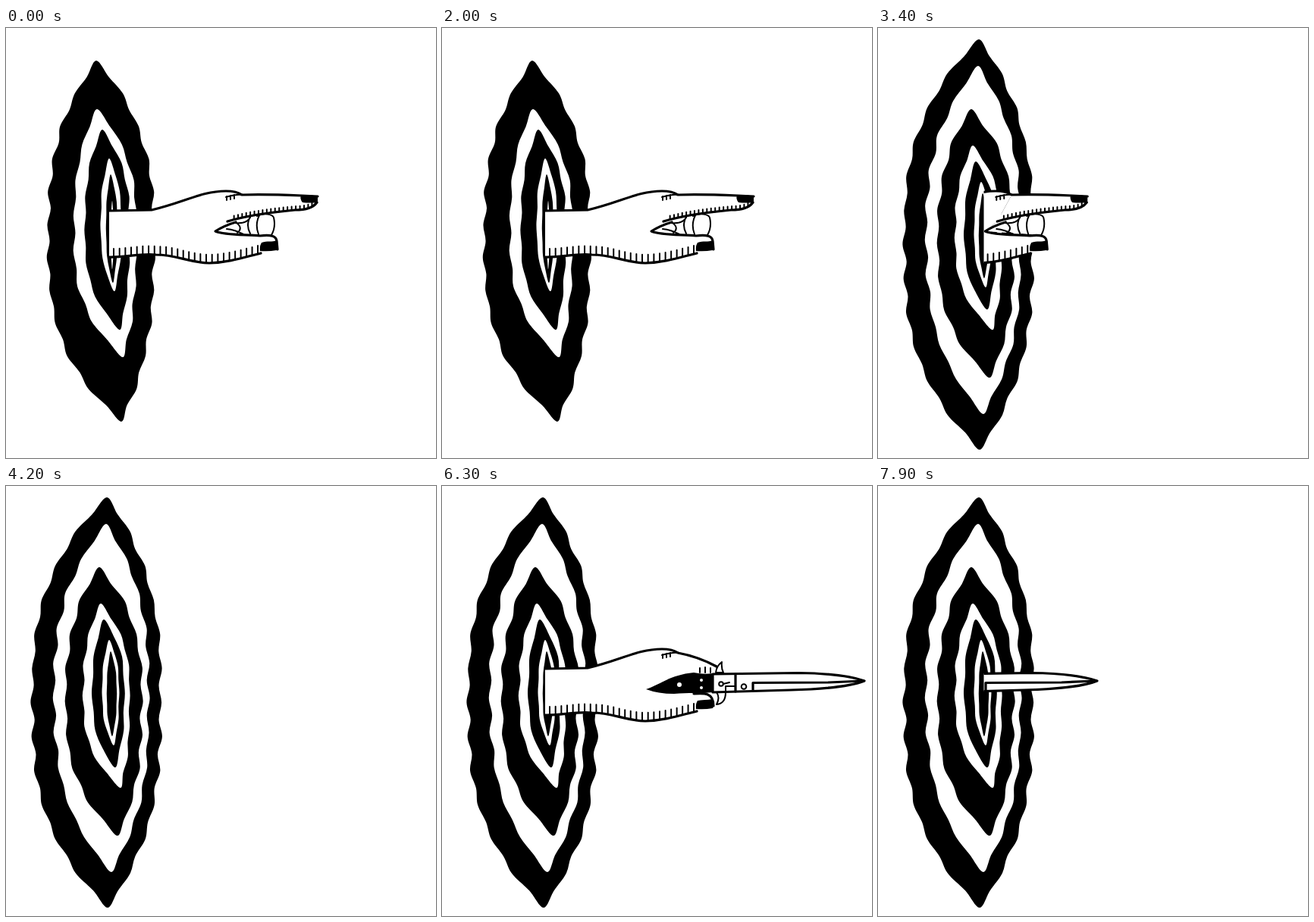
These frames come from a looping animation (567x567 px, 8000 ms). An HTML page:

```html
<!DOCTYPE html>
<html lang="en">
<head>
<meta charset="utf-8">
<title>Portal</title>
<style>
  html, body { margin: 0; width: 100%; height: 100%; overflow: hidden; background: #fff; }
  svg { display: block; width: 100vw; height: 100vh; }
  .line { fill: none; stroke: #000; stroke-width: 3.2; stroke-linecap: round; stroke-linejoin: round; }
  .thin { stroke-width: 2; }
  .paper { fill: #fff; }
  .ink { fill: #000; }
</style>
</head>
<body>
<svg viewBox="0 0 567 567">
  <defs>
    <clipPath id="slit"><rect id="slitBox" width="567" height="567"/></clipPath>
    <g id="arm">
      <path class="paper" d="M135 241L192 240C235 230 258 215 290 215Q304 215 311 220L292 255L276 268Q305 275 335 274L357 281V292L335 297C315 302 295 309 268 310C240 309 225 299 198 299C175 297 155 303 135 302Z"/>
      <path class="line" d="M135 241L192 240C235 230 258 215 290 215Q304 215 311 220"/>
      <path class="line thin" d="M311 220C304 219 297 221 290 223M291 222V227M296 221V226M301 220V225"/>
      <path class="line" id="palmEdge" d="M135 302C155 303 175 297 198 299C225 299 240 309 268 310C295 309 315 302 336 297"/>
      <path class="ink" d="M337 283C344 280 351 283 357 280Q360 287 357 293Q346 295 335 294Q334 288 337 283Z"/>
    </g>
  </defs>
  <g id="small"></g>
  <g id="large"></g>
  <g clip-path="url(#slit)">
    <g id="pointing">
      <use href="#arm"/>
      <path class="paper" d="M311 220L411 222Q413 239 381 240L353 247Q357 262 350 273L276 268L292 255Z"/>
      <path class="line" d="M311 220C340 219 365 220 390 221L411 222"/>
      <path class="line" id="fingerEdge" d="M292 255C318 247 350 243 381 240Q403 240 410 230"/>
      <path class="line" d="M303 256C293 259 284 263 276 268C290 274 318 272 335 274Q356 271 357 281L358 292"/>
      <path class="line thin" d="M302 257Q316 259 322 250M322 249Q316 260 322 271M334 247Q328 259 333 272M304 257Q313 264 305 270M331 248C340 243 352 246 353 250Q356 263 350 273M291 265Q302 266 313 272"/>
      <path class="ink" d="M389 221Q401 219 411 222V230Q400 231 391 230Q387 225 389 221Z"/>
    </g>
    <g id="armed">
      <use href="#arm"/>
      <path class="paper" d="M311 220Q338 225 362 238L358 281L335 283L276 268L292 255Z"/>
      <path class="line" d="M311 220Q338 225 362 238"/>
      <path class="line thin" d="M340 240V246M347 239V246M354 240V246"/>
      <path class="line" d="M332 274C346 273 358 272 358 290"/>
      <path class="line thin" style="fill:#fff" d="M361 246Q362 237 369 232Q368 240 371 246ZM362 272Q367 279 362 288Q374 287 374 272Z"/>
      <path class="line" style="fill:#fff" d="M357 248L470 246.5C510 247 540 251 557 257C540 264 500 268 460 269L357 272Z"/>
      <path class="line" d="M387 248V271M410 270V259.5L510 259L555 257"/>
      <path class="line thin" d="M371 261L379 259M387 264H374V271"/>
      <circle class="line thin" cx="368" cy="261" r="2.8"/>
      <circle class="line thin" cx="398" cy="264.5" r="3.3"/>
      <path class="ink" d="M269 268C286 263 300 249 332 246Q345 249 357 247V272C340 274 325 272 306 274Q285 274 269 268Z"/>
      <circle class="paper" cx="313" cy="262" r="3"/>
      <circle class="paper" cx="342" cy="256" r="2"/>
      <circle class="paper" cx="342" cy="266" r="2"/>
    </g>
  </g>
</svg>
<script>
const byId = id => document.getElementById(id);
const { small, large, pointing, armed, palmEdge, fingerEdge, slitBox } =
  Object.fromEntries([...document.querySelectorAll('[id]')].map(el => [el.id, el]));

let seed = 7;
const random = () => (seed = seed * 16807 % 2147483647) / 2147483647;

function addPath(parent, d, className) {
  const path = document.createElementNS('http://www.w3.org/2000/svg', 'path');
  path.setAttribute('d', d);
  path.setAttribute('class', className);
  parent.appendChild(path);
}

// Smooth closed curve through the points.
function smooth(pts) {
  const at = i => pts[(i + pts.length) % pts.length];
  return 'M' + pts[0] + pts.map((p, i) => {
    const before = at(i - 1), next = at(i + 1), after = at(i + 2);
    const c1 = p.map((v, k) => v + (next[k] - before[k]) / 6);
    const c2 = next.map((v, k) => v - (after[k] - p[k]) / 6);
    return `C${c1} ${c2} ${next}`;
  }).join('') + 'Z';
}

// Wavy spindle between two tips, swelling out to the left and right limits.
function ring([topX, topY], [bottomX, bottomY], left, right) {
  const height = bottomY - topY;
  const count = Math.max(8, 2 * Math.round(height / 44));
  const wave = Math.min(2.6, (right - left) / 40);
  const side = (limit, out) => Array.from({ length: count - 1 }, (_, i) => {
    const u = (i + 1) / count;
    const tip = u < 0.5 ? topX : bottomX;
    const swell = 1 - Math.abs(1 - 2 * u) ** 2.8;
    const bump = (i % 2 ? 1 : -1) * wave * (0.4 + 0.6 * random());
    return [tip + (limit - tip) * swell + out * bump, topY + height * u];
  });
  return smooth([[topX, topY], ...side(right, 1), [bottomX, bottomY], ...side(left, -1).reverse()]);
}

// Rings from the outside in, alternating black and white.
const drawRings = (group, rings) => rings.forEach((args, i) =>
  addPath(group, ring(...args), i % 2 ? 'paper' : 'ink'));

drawRings(small, [
  [[119, 43], [152, 519], 56, 195],
  [[120, 107], [154, 434], 90, 172],
  [[127, 134], [150, 398], 104, 163],
  [[136, 172], [143, 347], 125, 152],
  [[138, 193], [141, 336], 132, 147],
  [[140, 228], [140, 318], 138, 142]
]);
drawRings(large, [
  [[133, 15], [134, 556], 35, 204],
  [[132, 50], [139, 509], 64, 188],
  [[123, 107], [147, 461], 79, 179],
  [[125, 155], [151, 398], 102, 163],
  [[129, 176], [144, 371], 114, 156],
  [[136, 203], [142, 342], 127, 149],
  [[138, 218], [140, 330], 133, 146]
]);

// Short upright strokes standing on a curve.
function hatch(curve, from, gap, height) {
  let d = '';
  for (let s = from; s < curve.getTotalLength(); s += gap) {
    const p = curve.getPointAtLength(s);
    d += `M${p.x} ${p.y}v${-height}`;
  }
  addPath(curve.parentNode, d, 'line thin');
}
hatch(palmEdge, 7, 7.7, 11);
hatch(fingerEdge, 9, 5.5, 5);

const show = (el, on) => { el.style.display = on ? '' : 'none'; };

// The portal swaps size every step; steps are twice as fast while the knife comes out.
function portalStep(t) {
  if (t < 4600) return Math.floor(t / 200);
  return Math.floor(t < 5500 ? t / 100 - 23 : (t + 700) / 200);
}

function handShift(t) {
  const step = Math.max(0, Math.floor((t - 2000) / 200));
  return -7 * step - 1.75 * step * step;
}

function knifeShift(t) {
  const out = Math.floor((t - 4800) / 100);
  const back = Math.ceil((7900 - t) / 200);
  return Math.min(0, 48.5 * Math.min(out, back) - 268);
}

function render() {
  const t = performance.now() % 8000;
  const isLarge = portalStep(t) % 2 === 1;
  const hasKnife = t >= 4600;
  const shift = hasKnife ? knifeShift(t) : handShift(t);
  show(large, isLarge);
  show(small, !isLarge);
  show(pointing, t < 4200);
  show(armed, hasKnife);
  (hasKnife ? armed : pointing).setAttribute('transform', `translate(${shift} 0)`);
  slitBox.setAttribute('x', shift ? 139.5 : 136);
  requestAnimationFrame(render);
}
render();
</script>
</body>
</html>
```
